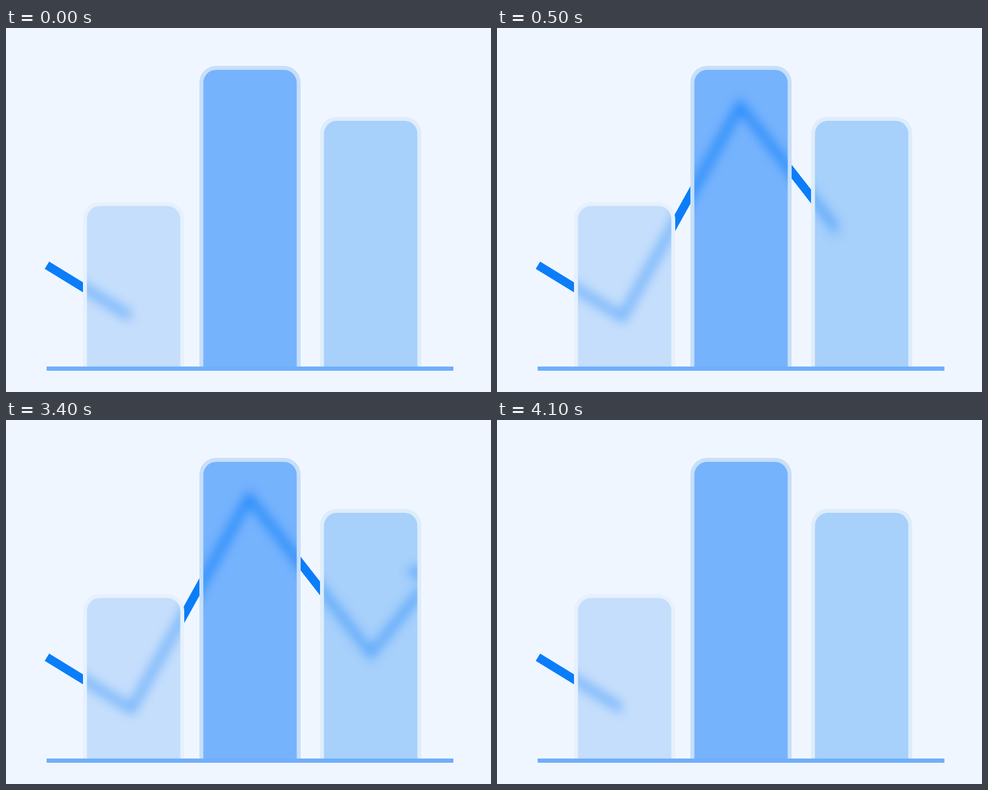
These frames come from a looping animation (800x600 px, 4.7 s). An HTML page:

```html
<!DOCTYPE html>
<html lang="en">
<head>
<meta charset="utf-8">
<title>Bar chart with trend arrow</title>
<style>
  html, body { margin: 0; width: 100%; height: 100%; overflow: hidden; background: #f0f6ff; }
  svg { display: block; width: 100%; height: 100%; }
</style>
</head>
<body>
<svg id="chart" viewBox="0 0 800 600">
  <defs>
    <clipPath id="wipe"><rect id="wipeRect" width="205" height="600"/></clipPath>
    <filter id="frost" filterUnits="userSpaceOnUse" x="0" y="0" width="800" height="600"
            color-interpolation-filters="sRGB">
      <feGaussianBlur stdDeviation="9"/>
    </filter>
    <g id="trend" clip-path="url(#wipe)">
      <path d="M67.5 391 L207 476.5 L401 128 L602 385 L694 270" fill="none" stroke="#0b7df9" stroke-width="14"/>
      <path d="M734 220 L723.5 298.5 L660 248 Z" fill="#0b7df9"/>
    </g>
  </defs>
  <use href="#trend"/>
  <g id="bars"></g>
  <rect x="67" y="558" width="671" height="7" fill="#6fafFc"/>
</svg>
<script>
const LOOP = 4700, STEP = 100, DURATION = 438;
const SHOW_AT = 330, HIDE_AT = 3354;
const WIPE_MIN = 205, WIPE_MAX = 740, BASE = 560;

const bars = [
  { x: 127, top: 287, fill: '#c5defc', edge: '#e6f1fd', tint: 0.45 },
  { x: 319, top: 62.5, fill: '#76b3fd', edge: '#c7dff9', tint: 0.74 },
  { x: 518, top: 146.5, fill: '#a7d0fb', edge: '#deedfb', tint: 0.5 }
];

// Bar outline with rounded top corners and a square foot
const barPath = (x, top, width, r) =>
  `M${x} ${BASE}V${top + r}a${r} ${r} 0 0 1 ${r} ${-r}h${width - 2 * r}a${r} ${r} 0 0 1 ${r} ${r}V${BASE}Z`;

document.getElementById('bars').innerHTML = bars.map(({ x, top, fill, edge, tint }, i) => {
  const inner = barPath(x + 6.5, top + 6.5, 154, 21);
  return `<clipPath id="bar${i}"><path d="${inner}"/></clipPath>
    <path d="${barPath(x, top, 167, 27.5)}" fill="${edge}"/>
    <path d="${inner}" fill="${fill}"/>
    <g clip-path="url(#bar${i})"><g filter="url(#frost)" opacity="${tint}"><use href="#trend"/></g></g>`;
}).join('');

// cubic-bezier(.25, .1, .25, 1)
function ease(t) {
  if (t <= 0) return 0;
  if (t >= 1) return 1;
  const curve = (s, a, b) => 3 * (1 - s) ** 2 * s * a + 3 * (1 - s) * s * s * b + s ** 3;
  let low = 0, high = 1;
  for (let i = 0; i < 24; i++) {
    const mid = (low + high) / 2;
    if (curve(mid, 0.25, 0.25) < t) low = mid; else high = mid;
  }
  return curve(low, 0.1, 1);
}

const wipeRect = document.getElementById('wipeRect');

function draw() {
  const time = Math.floor(performance.now() % LOOP / STEP) * STEP;
  const shown = ease((time - SHOW_AT) / DURATION) - ease((time - HIDE_AT) / DURATION);
  wipeRect.setAttribute('width', WIPE_MIN + (WIPE_MAX - WIPE_MIN) * shown);
  requestAnimationFrame(draw);
}
draw();
</script>
</body>
</html>
```
